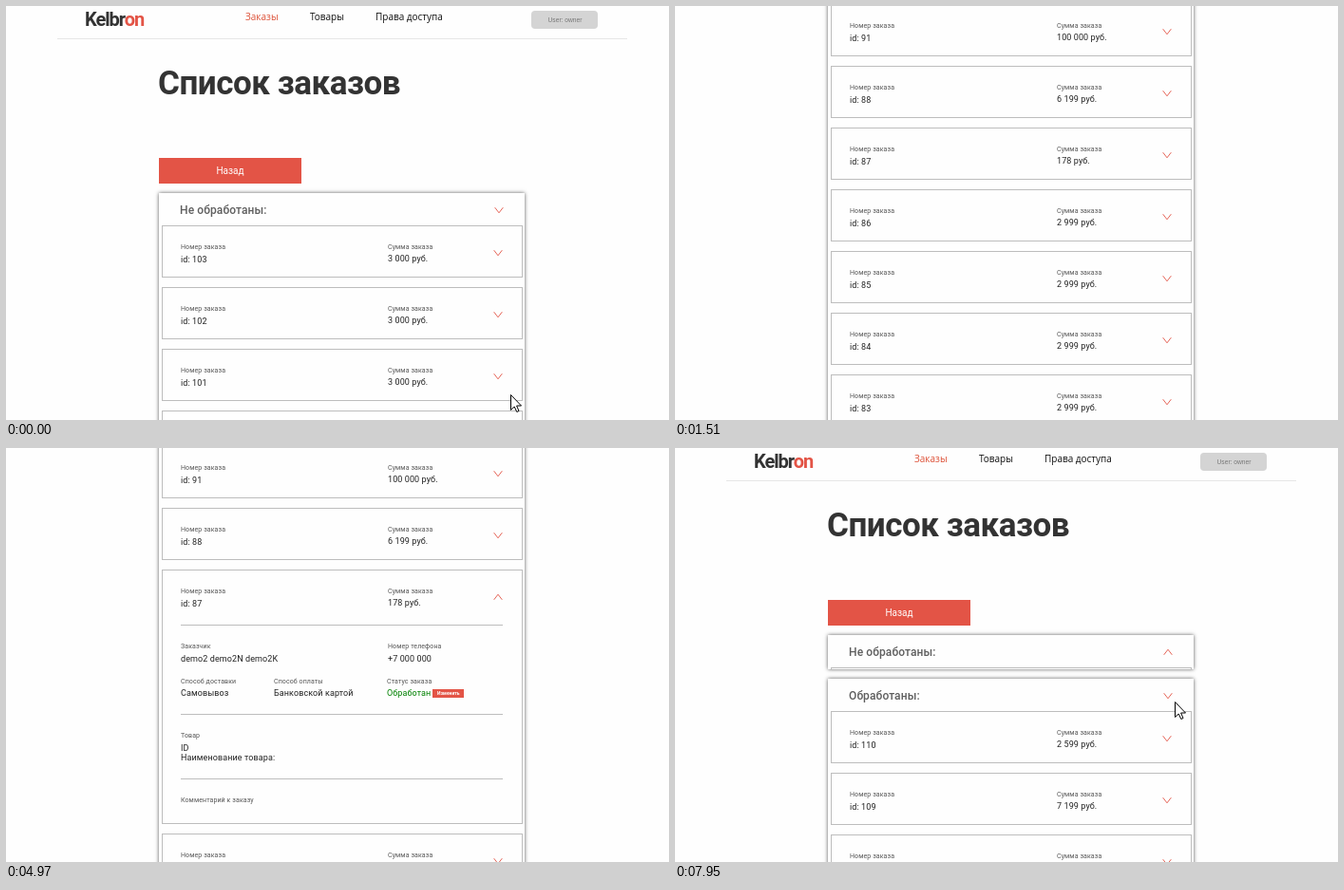
Animation of 698x436 px, one loop 8 s. Source, as an HTML page:

```html
<!DOCTYPE html>
<html lang="ru">
<head>
<meta charset="utf-8">
<title>Список заказов</title>
<style>
  html, body { margin: 0; width: 100%; height: 100%; overflow: hidden; background: #fefefe; }
  #stage { position: relative; width: 698px; height: 436px; overflow: hidden; background: #fefefe;
    font: 9px Roboto, sans-serif; letter-spacing: .1px; color: #222; }
  #page, #cursor { position: absolute; left: 0; top: 0; }
  #page { width: 698px; }
  #page div, #page svg, .t { position: absolute; }
  .t { line-height: 20px; margin-top: -10px; white-space: nowrap; }
  .mid { transform: translateX(-50%); }
  .logo { font-size: 20px; font-weight: 700; letter-spacing: -1px; color: #333; }
  .logo b { color: #e35446; }
  .nav { font: 10px/20px "Open Sans", sans-serif; letter-spacing: 0; color: #111; }
  .on { color: #dd5138; }
  .user { font: 6.67px/20px "Liberation Sans", sans-serif; letter-spacing: 0; color: #777; }
  .h1 { font-size: 35px; font-weight: 700; letter-spacing: -.5px; color: #333; }
  .back { font-size: 10px; color: #fff; letter-spacing: 0; }
  .title { font-size: 12px; font-weight: 500; color: #5e5e5e; }
  .label { font-size: 7px; color: #555; }
  #page .panel { left: 161px; width: 385px; background: #fefefe; box-shadow: 0 0 4px rgba(0, 0, 0, .65); }
  #page .clip { inset: 0; overflow: hidden; }
  #page .list { left: 3px; top: 34px; width: 380px; }
  #page .item { position: relative; height: 55px; margin-bottom: 10px; overflow: hidden;
    box-shadow: inset 0 0 0 1px #bdbdbd; }
  .hr { left: 20px; width: 339px; height: 1px; background: #bdbdbd; }
  .chev { width: 12px; height: 12px; fill: none; stroke: #e35446; stroke-width: .9; }
  .status { display: flex; align-items: center; }
  .status i { width: 33px; height: 9px; margin-left: 2px; background: #e35446; color: #fff; text-align: center;
    font: 700 5px/9px Roboto, sans-serif; letter-spacing: 0; }
  #cursor { width: 20px; height: 26px; fill: #fff; stroke: #000; stroke-width: 1; stroke-linejoin: round; }
</style>
</head>
<body>
<div id="stage">
  <div id="page"></div>
  <svg id="cursor"><path></path></svg>
</div>
<script>
const page = document.getElementById('page');
const cursor = document.getElementById('cursor');
const shape = cursor.firstElementChild;

const SHAPES = {
  arrow: 'M.5.5V16.5L4.2 13L6.8 18.5L9 17.5L6.6 12H11.5Z',
  hand: 'M5.5 14.5V2.5Q5.5.5 7 .5T8.5 2.5V8Q9 6.8 10.3 7T11.5 8.5Q12.5 7.3 13.7 8T14.5 9.5' +
    'Q15.5 8.6 16.5 9.3T17.5 11V15.5Q17.5 18 15.8 20V23.5H6.8V21.5L2.5 16Q.3 12.8 1 11.8Q2.5 10.6 4 12.5Z' +
    'M8.5 8V12M11.5 8.5V12M14.5 9.5V12'
};

function add(parent, cls, style = '', html = '') {
  const el = document.createElement('div');
  el.className = cls;
  el.style.cssText = style;
  el.innerHTML = html;
  return parent.appendChild(el);
}

// y is the middle of the line
function text(parent, x, y, cls, html) {
  return add(parent, 't ' + cls, `left:${x}px;top:${y}px`, html);
}

function chevron(parent, cx, cy) {
  parent.insertAdjacentHTML('beforeend',
    `<svg class="chev" style="left:${cx - 6}px;top:${cy - 6}px"><path d="M1.7 3.2L6 8.8L10.3 3.2"/></svg>`);
  return parent.lastElementChild;
}

function field(parent, x, y, label, value, dy = 13) {
  text(parent, x, y, 'label', label);
  return text(parent, x, y + dy, '', value);
}

function addItem(list, [id, sum]) {
  const el = add(list, 'item');
  field(el, 20, 22.5, 'Номер заказа', 'id: ' + id, 13.5);
  field(el, 238, 22.5, 'Сумма заказа', sum + ' руб.', 12.5);
  return { el, chev: chevron(el, 353.5, 29) };
}

function addPanel(top, title, orders) {
  const el = add(page, 'panel', `top:${top}px;height:1500px`);
  const clip = add(el, 'clip');
  text(clip, 22, 18, 'title', title);
  const chev = chevron(clip, 357.5, 18);
  const list = add(clip, 'list');
  return { el, chev, items: orders.map(o => addItem(list, o)) };
}

// Page header
text(page, 83, 13.5, 'logo', 'Kelbr<b>on</b>');
text(page, 252, 11, 'nav on', 'Заказы');
text(page, 320, 11, 'nav', 'Товары');
text(page, 389, 11, 'nav', 'Права доступа');
add(page, '', 'left:553px;top:5px;width:70px;height:19px;border-radius:4px;background:#d4d4d4');
text(page, 588.5, 14.5, 'user mid', 'User: owner');
add(page, '', 'left:54px;top:34px;width:600px;height:1px;background:#e6e6e6');
text(page, 160, 82, 'h1', 'Список заказов');
add(page, '', 'left:161px;top:160px;width:150px;height:27px;background:#e35446');
text(page, 236, 173.5, 'back mid', 'Назад');

// Order lists
const fresh = addPanel(197, 'Не обработаны:', [
  [103, '3 000'], [102, '3 000'], [101, '3 000'], [100, '1 879'], [91, '100 000'], [88, '6 199'],
  [87, '178'], [86, '2 999'], [85, '2 999'], [84, '2 999'], [83, '2 999'], [82, '2 999']
]);
const done = addPanel(243, 'Обработаны:', [[110, '2 599'], [109, '7 199'], [108, '2 999'], [107, '2 999']]);

// Details of the order that gets opened
const order = fresh.items[6];
for (const y of [58, 152, 220]) add(order.el, 'hr', `top:${y}px`);
field(order.el, 20, 81, 'Заказчик', 'demo2 demo2N demo2K');
field(order.el, 238, 81, 'Номер телефона', '+7 000 000');
field(order.el, 20, 117.5, 'Способ доставки', 'Самовывоз', 12.5);
field(order.el, 118, 117.5, 'Способ оплаты', 'Банковской картой', 12.5);
const status = field(order.el, 237, 117.5, 'Статус заказа', '<span></span><i>Изменить</i>', 12.5);
status.classList.add('status');
field(order.el, 20, 174.5, 'Товар', 'ID', 13.5);
text(order.el, 20, 198, '', 'Наименование товара:');
text(order.el, 20, 243, 'label', 'Комментарий к заказу');

const arrow = (x, y) => ({ cur: 'arrow', x, y });
const hand = (x, y) => ({ cur: 'hand', x, y });
const none = { cur: '' };

// Each step changes some values and holds them until the next one
const STEPS = [
  [0, { scroll: 0, open: 0, fold: 0, ready: false, height: 1500, ...arrow(531, 409) }],
  [120, none],
  [1130, { scroll: 162 }],
  [1250, { scroll: 300 }],
  [1390, { scroll: 430 }],
  [1510, { scroll: 493 }],
  [1890, arrow(489, 102)],
  [2140, arrow(491, 108)],
  [2260, arrow(499, 126)],
  [2380, arrow(509, 146)],
  [2500, hand(512, 157)],
  [2620, hand(513, 159)],
  [3000, hand(513, 160)],
  [3240, { open: .25 }],
  [3360, { open: .8 }],
  [3480, { open: 1, ...hand(508, 165) }],
  [3600, arrow(472, 202)],
  [3720, arrow(428, 241)],
  [3840, arrow(446, 249)],
  [3960, hand(466, 255)],
  [4080, hand(475, 256)],
  [4460, { ready: true }],
  [4970, none],
  [5600, { scroll: 160 }],
  [5720, { scroll: 0 }],
  [6100, hand(224, 163)],
  [6350, hand(236, 164)],
  [6470, arrow(340, 185)],
  [6590, arrow(445, 207)],
  [6710, arrow(482, 214)],
  [6960, arrow(490, 214)],
  [7080, arrow(506, 214)],
  [7200, hand(515, 214)],
  [7450, { fold: .25, ...hand(515, 217) }],
  [7570, { fold: .85, height: 130 }],
  [7690, { fold: 1, height: 36 }],
  [7830, arrow(524, 245)],
  [7950, arrow(526, 267)]
];
const LOOP = 8000;
let state = {};
const states = STEPS.map(([, change]) => state = { ...state, ...change });

function render(s) {
  page.style.transform = `translateY(${-s.scroll}px)`;
  order.el.style.height = 55 + Math.round(213 * s.open) + 'px';
  order.chev.style.transform = `rotate(${180 * s.open}deg)`;
  status.firstChild.textContent = s.ready ? 'Обработан' : 'Не обработан';
  status.firstChild.style.color = s.ready ? '#008000' : '#e33';
  fresh.el.style.height = s.height + 'px';
  fresh.chev.style.transform = `rotate(${180 * s.fold}deg)`;
  done.el.style.top = 197 + s.height + 10 + 'px';
  cursor.style.display = s.cur ? '' : 'none';
  if (s.cur) {
    shape.setAttribute('d', SHAPES[s.cur]);
    cursor.style.transform = `translate(${s.x}px, ${s.y}px)`;
  }
}

const start = performance.now();
let shown = -1;
function tick() {
  const t = (performance.now() - start) % LOOP;
  let i = STEPS.length - 1;
  while (STEPS[i][0] > t) i--;
  if (i !== shown) render(states[shown = i]);
  requestAnimationFrame(tick);
}
tick();
</script>
</body>
</html>
```
